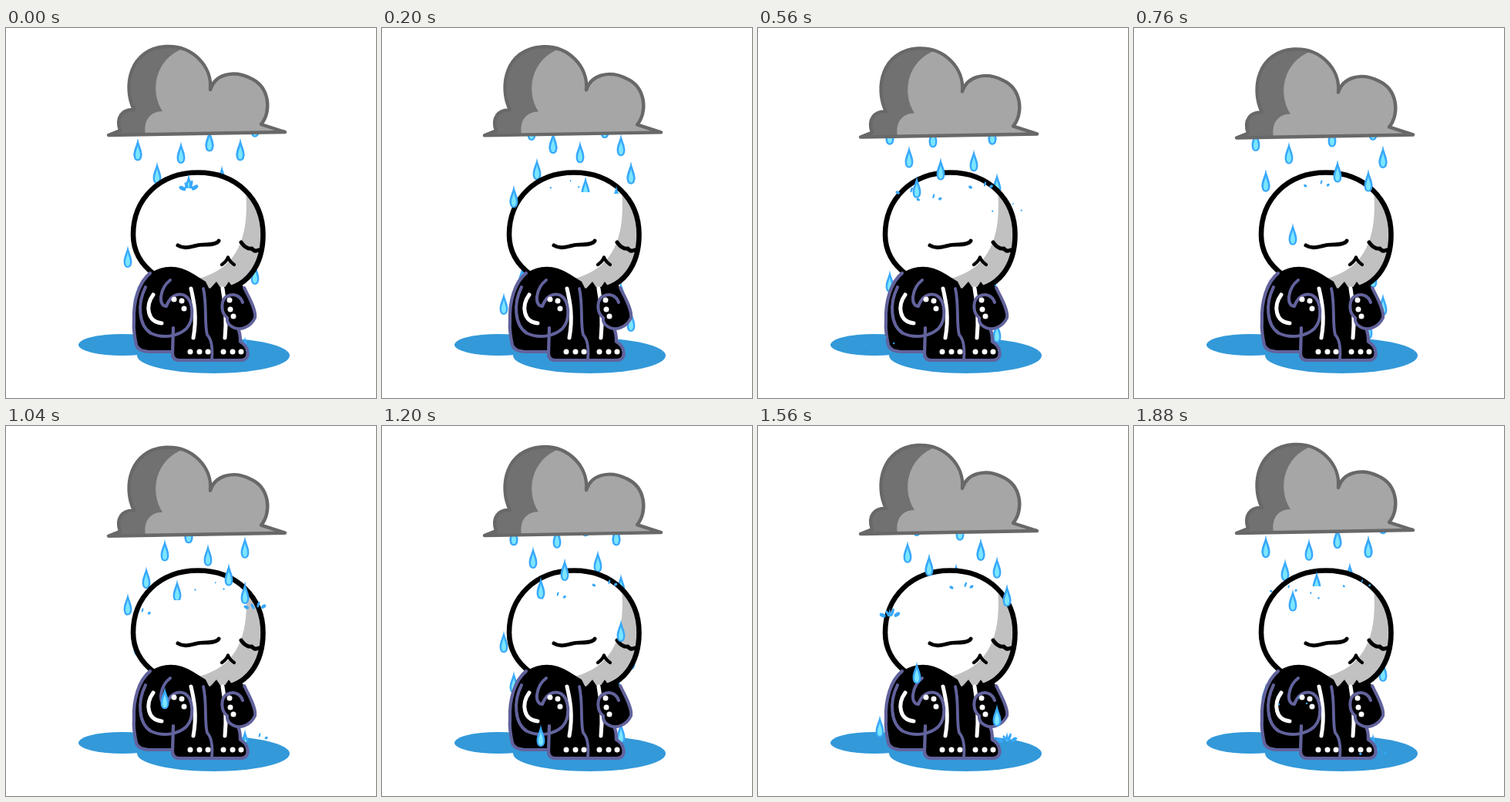
Write an HTML page with a canvas that moves like this. It is 480 px wide and 480 px high and loops after 1.92 s.

```html
<!DOCTYPE html>
<html lang="en">
<head>
<meta charset="utf-8">
<title>Rainy mood</title>
<style>
  html, body { margin: 0; width: 100%; height: 100%; overflow: hidden; background: #fff; }
  canvas { display: block; width: 480px; height: 480px; }
</style>
</head>
<body>
<canvas id="stage" width="480" height="480"></canvas>
<script>
const ctx = document.getElementById('stage').getContext('2d');
const LOOP = 1920, STEP = 40;
const CYCLE = 628;      // time between two drops of a column
const SPEED = 0.305;    // px per ms
const MOUTH = 150;      // height at which a drop's time is counted
const SPLASH_LIFE = 215;

const BLUE = '#38a8fa', PALE = '#7be6fd', POOL = '#3399d9';
const PURPLE = '#62629c', BLACK = '#000', WHITE = '#fff';
const GREY = '#a6a6a6', DARK = '#717171', EDGE = '#686868', SHADE = '#c1c1c1';

const path = d => new Path2D(d);

const dropOuter = path('M0-15C1-7 5.4-1 5.4 6C5.4 11 3.2 14 0 14C-3.2 14-5.4 11-5.4 6C-5.4-1-1-7 0-15Z');
const dropInner = path('M0-6C.5-2 3 2 3 6.5C3 10 1.8 12 0 12C-1.8 12-3 10-3 6.5C-3 2-.5-2 0-6Z');

const cloud = path('M133 139L148 133C142 116 151 105 166 106C151 75 161 27 207 24C242 22 268 50 265 80C271 60 295 54 317 65C342 76 345 108 331 125L362 135Z');
const cloudLight = path('M231 26C193 40 186 82 203 108C187 108 178 120 181 138L362 135L331 125C345 108 342 76 317 65C295 54 271 60 265 80C266 55 252 34 231 26Z');

const head = path('M249 187.5C299 187.5 333.5 222 333.5 268C333.5 305 315 341 268 341C205 341 165 309 165 268C165 222 199 187.5 249 187.5Z');
const headShade = path('M310 200C317 262 306 310 250 325L262 346H340V200Z');
const eyes = path('M223 282C231 287 239 284 246 282.5C254 279.5 262 282 269 280Q275 278.5 276 276M305 278C310 285 314 287 319 286Q322 291 328 288');
const mouth = path('M280 307Q286 303 288 297.5Q290 303 296 307');

const body = path('M187 318Q214 301 243 319L259 329L264 339L273 329L281 341L289 329L296 339L303 329L311 340L300 388Q304 396 303 406Q314 411 313 421Q313 430 304 430H225Q217 430 217 420H185Q173 420 170 412C167 402 165 392 166 380C165 355 172 330 187 318Z');
const outline = path('M187 318C172 330 165 355 166 380C165 392 167 402 169 411Q171 419 185 420H216M217 389L216 422Q216 431 225 431H304Q314 431 313.5 421Q313 412 304 407Q304 396 301 390');
const leftArm = path('M181 336C170 358 172 386 188 396C206 404 224 399 234 390C245 378 243 354 232 347C221 342 212 350 208 361C197 361 199 338 213 327');
const rightArm = path('M309 337C314 347 325 366 323 376C317 389 303 393 294 388Q286 384 287 376C278 369 279 354 285 349C295 343 304 347 307 356');
const seam = path('M256 338C261 360 257 382 261 398Q269 406 267 430');
const bones = path('M240 338C244 355 248 375 243 402M281 338C285 360 286 382 284 402M191 346C180 361 184 382 202 383');
const dots = [
  [218, 352], [228, 354], [231, 364], [290, 353], [291, 365], [295, 374],
  [239, 420], [251, 420], [262, 420], [282, 420], [294, 420], [305, 420]
];

// x, time, lowest point: drops passing behind the figure
const farDrops = [
  [171, -27, 400], [196, -125, 400], [201, 91, 400], [227, -39, 400],
  [237, -177.5, 400], [257, 163, 400], [262, 354, 400], [264, 12, 400],
  [280, -141, 400], [289, 269, 400], [304, -27, 408], [310, 387, 410],
  [310, 193, 410], [222, 203, 400]
];

// x, time, landing height, period in cycles, splash
const hits = [
  [237, -177.5, 208, 1, true], [264, 12, 213, 1, true], [171, -27, 247, 1, true],
  [222, 203, 226, 1, true], [289, 269, 210, 1, true], [304, -27, 215, 1, false],
  [323, 74, 238, 1, true], [194, 259, 217, 2, true]
];

// x, time, landing height: single drops falling in front
const nearDrops = [
  [158, -482, 411], [158, 773, 411], [310, 820, 428],
  [206, 374, 427], [206, 1002, 362], [206, 1629, 427]
];

function fill(shape, color) {
  ctx.fillStyle = color;
  ctx.fill(shape);
}

function stroke(shape, color, width) {
  ctx.strokeStyle = color;
  ctx.lineWidth = width;
  ctx.stroke(shape);
}

function oval(x, y, rx, ry, color, turn = 0) {
  ctx.fillStyle = color;
  ctx.beginPath();
  ctx.ellipse(x, y, rx, ry, turn, 0, Math.PI * 2);
  ctx.fill();
}

const heightAt = (t, start) => MOUTH + SPEED * (t - start);

function drop(x, y, floor) {
  if (y < 118 || y > floor + 15) return;
  ctx.save();
  ctx.beginPath();
  ctx.rect(0, 0, 480, floor);
  ctx.clip();
  ctx.translate(x, y);
  fill(dropOuter, BLUE);
  fill(dropInner, PALE);
  ctx.restore();
}

function splash(x, floor, t, start) {
  const hit = start + (floor - 4 - MOUTH) / SPEED;
  const age = t - hit;
  if (hit < -20 || age < 0 || age > SPLASH_LIFE) return;
  const p = age / SPLASH_LIFE;
  const size = 1 - 0.6 * p;
  const lift = 4 + 14 * p * (1 - p);
  const reach = 8 + 11 * p;
  const petal = 2.2 * (1 - p) * size;
  oval(x - reach, floor - lift + 4, 2.6 * size + petal, 2.6 * size, BLUE, 0.45);
  oval(x + reach, floor - lift + 3, 2.6 * size + petal, 2.6 * size, BLUE, -0.6);
  oval(x + 3 + 5 * p, floor - 5 - 5 * p, 1.8 * size, 4.5 * (1 - p) + 1, BLUE, 0.3);
  if (p < 0.3) oval(x - 3, floor - 4, 1.6, 4, BLUE, -0.5);
}

function eachDrop(first, period, draw) {
  for (let start = first - 2 * period; start < LOOP + 150; start += period) draw(start);
}

function drawFigure() {
  fill(head, WHITE);
  ctx.save();
  ctx.clip(head);
  fill(headShade, SHADE);
  ctx.restore();
  stroke(head, BLACK, 6.6);
  stroke(eyes, BLACK, 5);
  stroke(mouth, BLACK, 4.2);

  fill(body, BLACK);
  stroke(outline, PURPLE, 4.2);
  stroke(seam, PURPLE, 3.8);
  stroke(bones, WHITE, 5);
  fill(rightArm, BLACK);
  stroke(leftArm, PURPLE, 4);
  stroke(rightArm, PURPLE, 4);
  for (const [x, y] of dots) oval(x, y, 3.5, 3.5, WHITE);
}

function drawCloud(t) {
  ctx.save();
  ctx.translate(0, 1.9 * (1 - Math.cos(2 * Math.PI * t / 1880)));
  fill(cloud, DARK);
  fill(cloudLight, GREY);
  stroke(cloud, EDGE, 4.4);
  ctx.restore();
}

function draw(t) {
  ctx.fillStyle = WHITE;
  ctx.fillRect(0, 0, 480, 480);
  oval(151, 411, 57, 14, POOL);
  oval(269, 425, 99, 23, POOL);

  for (const [x, first, floor] of farDrops) {
    eachDrop(first, CYCLE, s => drop(x, heightAt(t, s), floor));
  }
  eachDrop(886, 2 * CYCLE, s => drop(182, heightAt(t, s), 400));
  eachDrop(74, CYCLE, s => {
    drop(323, heightAt(t, s), 409);
    splash(323, 409, t, s);
  });

  drawFigure();

  for (const [x, first, floor, every, wet] of hits) {
    eachDrop(first, every * CYCLE, s => {
      drop(x, heightAt(t, s), floor);
      if (wet) splash(x, floor, t, s);
    });
  }
  for (const [x, start, floor] of nearDrops) {
    drop(x, heightAt(t, start), floor);
    splash(x, floor, t, start);
  }
  drawCloud(t);
}

ctx.lineCap = ctx.lineJoin = 'round';
const begin = performance.now();

function tick() {
  const t = (performance.now() - begin) % LOOP;
  draw(Math.floor(t / STEP) * STEP);
  requestAnimationFrame(tick);
}
tick();
</script>
</body>
</html>
```
